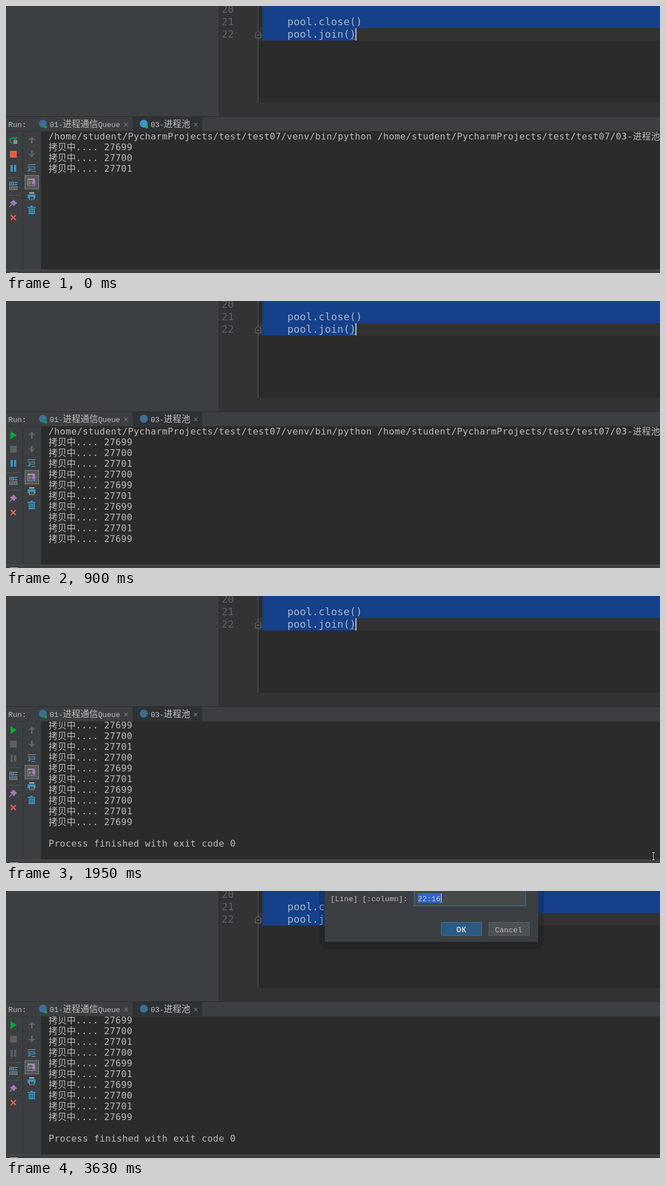
Animation, 1153 px wide and 472 px high, one loop 3730 ms. Source, as an HTML page with a canvas:

```html
<!DOCTYPE html>
<html lang="zh">
<head>
<meta charset="utf-8">
<title>Run console</title>
<style>
html, body { margin: 0; width: 100%; height: 100%; overflow: hidden; background: #2b2b2b; }
canvas { display: block; }
</style>
</head>
<body>
<canvas id="stage" width="1153" height="472"></canvas>
<script>
const ctx = document.getElementById('stage').getContext('2d');
const LOOP = 3730;
const MONO = "'DejaVu Sans Mono', monospace";
const UI = "'Liberation Mono', monospace";
const CJK = "'Noto Sans CJK SC', 'Noto Sans CJK', sans-serif";
const BLUE = '#3592c4', GREY = '#5d5f60', ICON = '#9a9da0', PURPLE = '#a878b8', GREEN = '#0aa63c';

const PIDS = [0, 1, 2, 1, 0, 2, 0, 1, 2, 0].map(n => 27699 + n);
const ROOT = '/home/student/PycharmProjects/test/test07/';
const COMMAND = ROOT + 'venv/bin/python ' + ROOT + '03-进程池';

const POINTER = [
  { at: 1500, x: 1144, y: 310 },
  { at: 1650, x: 1129, y: 348 },
  { at: 1800, x: 1127, y: 398 },
  { at: 1950, x: 1138, y: 452 },
  { at: 2100, x: 1134, y: 457 },
  { at: 2250, x: 1133, y: 468, arrow: true },
  { at: 2400, x: 1133, y: 470, arrow: true }
];

const within = (t, a, b) => t >= a && t < b;

function rect(x, y, w, h, color) {
  ctx.fillStyle = color;
  ctx.fillRect(x, y, w, h);
}

function frame(x, y, w, h, color, line = 1) {
  ctx.strokeStyle = color;
  ctx.lineWidth = line;
  ctx.strokeRect(x + line / 2, y + line / 2, w - line, h - line);
}

function poly(points, color) {
  ctx.fillStyle = color;
  ctx.beginPath();
  points.forEach(([x, y]) => ctx.lineTo(x, y));
  ctx.fill();
}

function path(points, color, width = 1) {
  ctx.strokeStyle = color;
  ctx.lineWidth = width;
  ctx.beginPath();
  points.forEach(([x, y]) => ctx.lineTo(x, y));
  ctx.stroke();
}

function dot(x, y, r, color) {
  ctx.fillStyle = color;
  ctx.beginPath();
  ctx.arc(x, y, r, 0, Math.PI * 2);
  ctx.fill();
}

// Latin runs sit on a fixed cell, Chinese runs on their own full-width cell.
function text(str, x, y, color, { font, size, cell, wide = size, bold = '' }) {
  ctx.fillStyle = color;
  for (const run of str.match(/[\u4e00-\u9fff]+|[^\u4e00-\u9fff]+/g)) {
    const han = run.charCodeAt(0) > 0x4dff;
    const step = han ? wide : cell;
    ctx.letterSpacing = '0px';
    ctx.font = han ? `300 ${wide}px ${CJK}` : `${bold} ${size}px ${font}`;
    const natural = ctx.measureText(han ? '中' : '0').width;
    ctx.letterSpacing = (step - natural) + 'px';
    ctx.fillText(run, x, y);
    x += step * run.length;
  }
  ctx.letterSpacing = '0px';
}

const CODE = { font: MONO, size: 18, cell: 11 };
const OUT = { font: MONO, size: 16, cell: 10 };
const TAB = { font: UI, size: 13.2, cell: 7.75, wide: 15.5 };
const LABEL = { font: UI, size: 13.4, cell: 8 };

function cross(x, y, r, color, width) {
  path([[x - r, y - r], [x + r, y + r]], color, width);
  path([[x - r, y + r], [x + r, y - r]], color, width);
}

function editor(caret) {
  rect(0, 0, 375, 195, '#3c3f41');
  rect(375, 0, 1, 195, '#2c2e2f');
  rect(376, 0, 777, 195, '#313335');
  rect(445, 0, 708, 171, '#2b2b2b');
  rect(445, 39, 708, 22, '#323232');
  rect(452, 0, 701, 39, '#164089');
  rect(452, 39, 165, 22, '#164089');
  rect(444, 0, 1, 171, '#555759');

  ['20', '21', '22'].forEach((n, i) => text(n, 380, 12 + 22 * i, '#606366', CODE));
  text('pool.close()', 496, 34, '#a9b7c6', CODE);
  text('pool.join()', 496, 56, '#a9b7c6', CODE);

  const mark = [[439.5, 56.5], [439.5, 48.5], [444.5, 44.5], [449.5, 48.5], [449.5, 56.5], [439.5, 56.5]];
  poly(mark, '#313335');
  path(mark, '#707274');
  rect(442, 51, 5, 1, '#808284');

  const wave = [];
  for (let x = 606; x <= 617; x += 2) wave.push([x, x % 4 ? 59.5 : 57.5]);
  path(wave, '#7f9fb5');
  if (caret) rect(616, 39, 2, 22, '#bbbbbb');
}

function tabs(running) {
  rect(0, 195, 1153, 1, '#2a2c2d');
  rect(0, 196, 1153, 26, '#3c3f41');
  rect(223, 196, 123, 26, '#2f3234');
  rect(0, 221, 1153, 1, '#323435');
  text('Run:', 4, 214, '#bbbbbb', LABEL);

  dot(65, 208, 7, '#3b6f94');
  dot(70, 214, 2.5, GREEN);
  text('01-进程通信Queue', 77, 214, '#bbbbbb', TAB);
  cross(211.5, 209.5, 3, '#707375', 1.2);

  dot(243, 208, 7, running ? '#3a96c8' : '#3b6f94');
  if (running) dot(248, 214, 2.5, '#10c040');
  text('03-进程池', 255, 214, '#c4c4c4', TAB);
  cross(334.5, 209.5, 3, '#707375', 1.2);
}

function runIcons(running, paused) {
  if (running) {
    ctx.strokeStyle = GREEN;
    ctx.lineWidth = 2;
    ctx.beginPath();
    ctx.arc(12, 238, 5, Math.PI * 0.55, Math.PI * 1.75);
    ctx.stroke();
    poly([[13, 236], [19, 236], [19, 230]], GREEN);
    rect(13, 237, 7, 7, '#8b8e90');
  } else {
    poly([[8, 230], [19, 237], [8, 244]], GREEN);
  }
  rect(7, 256, 12, 12, running ? '#ed5b4c' : GREY);
  rect(8, 281, 4, 12, paused ? BLUE : GREY);
  rect(14, 281, 4, 12, paused ? BLUE : GREY);
}

function sideIcons() {
  for (const y of [303, 334])
    for (let x = 3; x < 26; x += 3) rect(x, y, 1, 1, '#85888a');

  // layout
  frame(6, 311, 8, 6, ICON);
  rect(8, 313, 4, 2, BLUE);
  rect(15, 311, 5, 2, BLUE);
  rect(15, 315, 5, 2, BLUE);
  frame(6, 319, 14, 6, ICON);
  rect(8, 321, 10, 2, '#74777a');

  // pin
  poly([[13, 342], [20, 349], [17, 350], [14, 354], [7, 347], [11, 345]], PURPLE);
  path([[10, 351], [6, 355]], ICON, 1.5);
  cross(13, 374, 4.5, '#f06050', 2.2);

  // arrows
  for (const [y, d] of [[237, -1], [261, 1]]) {
    rect(44, y - 5, 3, 11, '#636668');
    poly([[39.5, y], [45.5, y + 6 * d], [51.5, y], [49, y], [45.5, y + 3 * d], [42, y]], '#636668');
  }

  // soft wrap
  rect(38, 280, 14, 1, ICON);
  rect(38, 284, 5, 1, ICON);
  rect(38, 291, 5, 1, ICON);
  path([[44, 284.5], [50.5, 284.5], [50.5, 288.5], [42, 288.5]], BLUE, 1.5);
  poly([[39, 288.5], [43, 285.5], [43, 291.5]], BLUE);
  rect(45, 292, 7, 1, ICON);

  // scroll to end
  rect(33, 299, 25, 25, '#55585b');
  frame(33, 299, 25, 25, '#808386');
  frame(38, 305, 13, 13, '#929597');
  rect(38, 305, 9, 3, '#929597');
  rect(40, 310, 4, 5, '#777a7d');
  rect(47, 305, 3, 7, '#b878cc');
  poly([[44, 311], [53, 311], [48.5, 316]], '#b878cc');

  // printer
  rect(41, 329, 9, 3, ICON);
  rect(38, 333, 14, 7, BLUE);
  rect(41, 336, 9, 7, '#3c3f41');
  frame(41, 336, 9, 7, ICON);
  rect(43, 339, 5, 1, BLUE);

  // trash
  rect(38, 355, 14, 2, BLUE);
  rect(43, 353, 4, 2, BLUE);
  rect(40, 358, 11, 10, BLUE);
  for (const x of [42, 45, 48]) rect(x, 359, 1, 7, '#2b4657');
}

function consoleView(t) {
  rect(62, 222, 1091, 244, '#2b2b2b');
  const done = t >= 1050;
  const count = t < 150 ? 3 : t < 450 ? 6 : t < 750 ? 9 : 10;
  const top = done ? 215 : 236;

  ctx.save();
  ctx.beginPath();
  ctx.rect(62, 222, 1091, 244);
  ctx.clip();
  text(COMMAND, 75, top, '#bbbbbb', OUT);
  PIDS.slice(0, count).forEach((pid, i) =>
    text('拷贝中.... ' + pid, 75, top + 19 * (i + 1), '#bbbbbb', OUT));
  if (done) text('Process finished with exit code 0', 75, top + 19 * 12, '#bbbbbb', OUT);
  ctx.restore();
}

function dialog(caret) {
  ctx.fillStyle = 'rgba(0,0,0,0.16)';
  ctx.beginPath();
  ctx.roundRect(552, -30, 396, 133, 16);
  ctx.fill();
  rect(562, 0, 376, 90, '#3c3f41');
  text('[Line] [:column]:', 572, 18, '#bbbbbb', LABEL);

  rect(719, -4, 198, 31, '#3b638a');
  rect(721, -4, 194, 29, '#45494a');
  rect(726, 4, 41, 17, '#2f65ca');
  text('22:16', 726, 18, '#c6c6c6', LABEL);
  if (caret) rect(767, 4, 1, 17, '#dddddd');

  rect(767, 55, 72, 24, '#2d5a84');
  frame(767, 55, 72, 24, '#467197');
  text('OK', 794, 73, '#d0d0d0', { ...LABEL, size: 14, cell: 9, bold: 'bold' });
  rect(851, 55, 72, 24, '#4c5052');
  frame(851, 55, 72, 24, '#606365');
  text('Cancel', 862, 73, '#bbbbbb', LABEL);
}

function pointer(t) {
  const p = t < 2700 && POINTER.findLast(s => t >= s.at);
  if (!p) return;
  const { x, y } = p;
  if (p.arrow) {
    for (let i = 0; y + i < 472; i++) rect(x, y + i, i + 1, 1, '#161616');
    return;
  }
  rect(x, y, 7, 3, '#161616');
  rect(x + 2, y, 3, 16, '#161616');
  rect(x, y + 13, 7, 3, '#161616');
  rect(x + 1, y + 1, 5, 1, '#e8e8e8');
  rect(x + 3, y + 1, 1, 14, '#e8e8e8');
  rect(x + 1, y + 14, 5, 1, '#e8e8e8');
}

function draw(t) {
  const running = t < 900;
  const caret = t < 150 || within(t, 600, 1350) || within(t, 1650, 2100);

  editor(caret);
  tabs(running);
  rect(0, 222, 62, 244, '#3c3f41');
  rect(29, 222, 1, 244, '#303234');
  rect(61, 222, 1, 244, '#353739');
  runIcons(running, t < 1350);
  sideIcons();
  consoleView(t);

  rect(0, 466, 1153, 1, '#505355');
  rect(0, 467, 1153, 5, '#3c3f41');
  rect(7, 471, 14, 1, '#b0b2b4');

  if (t >= 2700) dialog(!within(t, 3150, 3630));
  pointer(t);
}

const start = performance.now();
function tick() {
  draw((performance.now() - start) % LOOP);
  requestAnimationFrame(tick);
}
tick();
</script>
</body>
</html>
```
